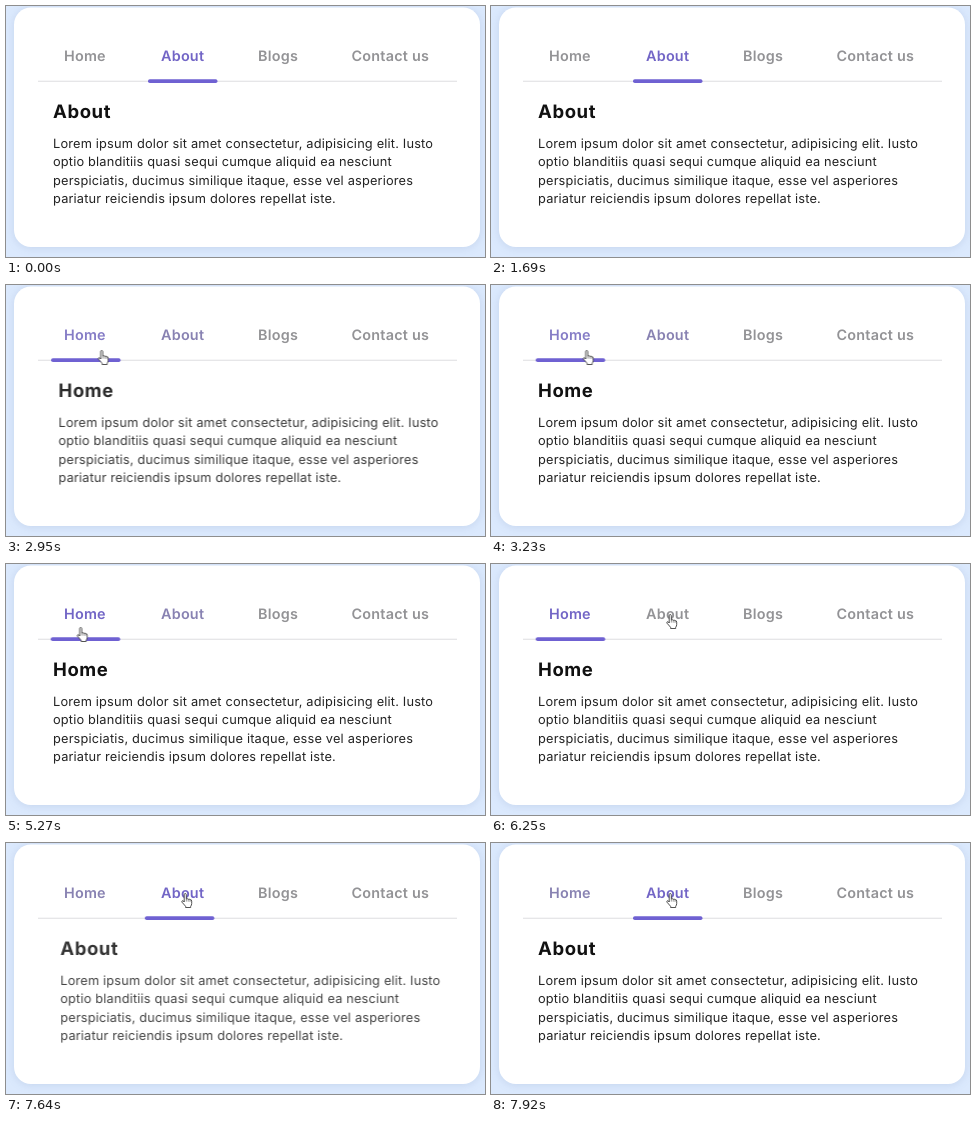
An HTML page that plays this animation: 479x251 px, repeating every 7.99 s.

```html
<!DOCTYPE html>
<html lang="en">
<head>
<meta charset="utf-8">
<title>Tabs</title>
<style>
  html, body { margin: 0; width: 100%; height: 100%; overflow: hidden; background: #dbe9fd; }
  svg { display: block; width: 479px; height: 251px; }
  text { font-family: Inter, "Open Sans", sans-serif; text-rendering: geometricPrecision; }
  .card { fill: #fff; filter: drop-shadow(0 1px 4px rgba(50, 80, 130, .13)); }
  .tab { font-size: 14.4px; font-weight: 600; letter-spacing: .22px; fill: #939396; }
  .title { font-size: 18.5px; font-weight: 700; letter-spacing: .6px; fill: #111; }
  .body { font-size: 12.8px; letter-spacing: .17px; fill: #232323; }
  #bar { fill: #6f61d2; }
</style>
</head>
<body>
<svg viewBox="0 0 479 251">
  <rect class="card" x="8" y="1.5" width="466" height="239.5" rx="17"/>
  <rect x="32" y="74.7" width="419" height="1.1" fill="#e0e0e3"/>
  <g class="tab">
    <text id="home" x="58" y="55">Home</text>
    <text id="about" x="155" y="55">About</text>
    <text x="252" y="55">Blogs</text>
    <text x="345.5" y="55">Contact us</text>
  </g>
  <rect id="bar" y="73.3" width="69.5" height="3.7" rx="1.8"/>
  <g id="panel">
    <text id="titleAbout" class="title" x="47" y="112">About</text>
    <text id="titleHome" class="title" x="47" y="112">Home</text>
    <g id="copy" class="body"></g>
  </g>
  <g id="cursor" stroke="#333" stroke-width=".85" stroke-linejoin="round">
    <path fill="#fff" d="M3.2 9V1.6a1 1 0 0 1 2.1 0V6q.9-.9 1.9.3 1-.7 1.8.4 1.7-.3 1.7 1.4v2.4q0 1.6-1 2.8v1.2H4.6v-1.2L1 9.2Q.4 7.9 1.6 7.7q1 .1 1.6 1.3z"/>
    <path fill="none" stroke-width=".5" d="M5.3 6v2.6M7.2 6.3v2.4M9 6.7v2.2"/>
  </g>
</svg>
<script>
const LOOP = 7990;
const STEP = 70;
const TO_HOME = 2645, TO_ABOUT = 7361;
const GREY = '#939396', PURPLE = '#7265c6', SOFT = '#857cc6', FADED = '#8882b2';
const $ = id => document.getElementById(id);

const lines = [
  'Lorem ipsum dolor sit amet consectetur, adipisicing elit. Iusto',
  'optio blanditiis quasi sequi cumque aliquid ea nesciunt',
  'perspiciatis, ducimus similique itaque, esse vel asperiores',
  'pariatur reiciendis ipsum dolores repellat iste.'
];
lines.forEach((line, i) => {
  const el = document.createElementNS('http://www.w3.org/2000/svg', 'text');
  el.setAttribute('x', 47);
  el.setAttribute('y', 141.5 + i * 18.65);
  el.textContent = line;
  $('copy').append(el);
});

// Rows are [ms, properties, easing towards the next row].
const tracks = [];
function track(id, rows) {
  const full = [[0, rows[0][1]], ...rows, [LOOP, rows[rows.length - 1][1]]];
  const frames = full.map(([ms, props, easing = 'linear']) => ({ offset: ms / LOOP, easing, ...props }));
  const anim = $(id).animate(frames, { duration: LOOP, fill: 'both' });
  anim.pause();
  tracks.push(anim);
}
const at = (x, y = 0) => ({ transform: `translate(${x}px, ${y}px)` });
const fill = color => ({ fill: color });
const show = opacity => ({ opacity });

track('bar', [
  [TO_HOME, at(142), 'ease-in-out'], [TO_HOME + 320, at(44.7)],
  [TO_ABOUT, at(44.7), 'ease-in-out'], [TO_ABOUT + 320, at(142)]
]);

const shown = { ...at(0), ...show(1) }, hidden = { ...at(50), ...show(0) };
track('panel', [TO_HOME, TO_ABOUT].flatMap(ms => [
  [ms, shown], [ms, hidden, 'ease'], [ms + 500, shown]
]));

const flip = (before, during) => [
  [TO_HOME, show(before)], [TO_HOME, show(during)],
  [TO_ABOUT, show(during)], [TO_ABOUT, show(before)]
];
track('titleAbout', flip(1, 0));
track('titleHome', flip(0, 1));

track('home', [
  [2600, fill(GREY)], [2670, fill(SOFT)],
  [4140, fill(SOFT)], [4630, fill(PURPLE)],
  [7361, fill(PURPLE)], [7500, fill(FADED)]
]);
track('about', [
  [2600, fill(PURPLE)], [2740, fill(FADED)],
  [5760, fill(FADED)], [6040, fill(GREY)],
  [7361, fill(GREY)], [7500, fill(PURPLE)]
]);

track('cursor', [
  [1690, at(-16, 255), 'ease-out'], [2180, at(91.5, 65)],
  [4140, at(91.5, 65), 'ease-in-out'], [4630, at(70.5, 63)],
  [5270, at(70.5, 63), 'ease-in-out'], [6040, at(175, 50)]
]);

// The picture advances in even steps, realigned at each burst of motion.
function stepped(ms) {
  const base = ms < 5270 ? 10 : ms < 7290 ? 5270 : 7290;
  return Math.max(0, base + Math.floor((ms - base) / STEP) * STEP);
}

const start = performance.now();
function draw() {
  const ms = stepped((performance.now() - start) % LOOP);
  for (const anim of tracks) anim.currentTime = ms;
  requestAnimationFrame(draw);
}
draw();
</script>
</body>
</html>
```
